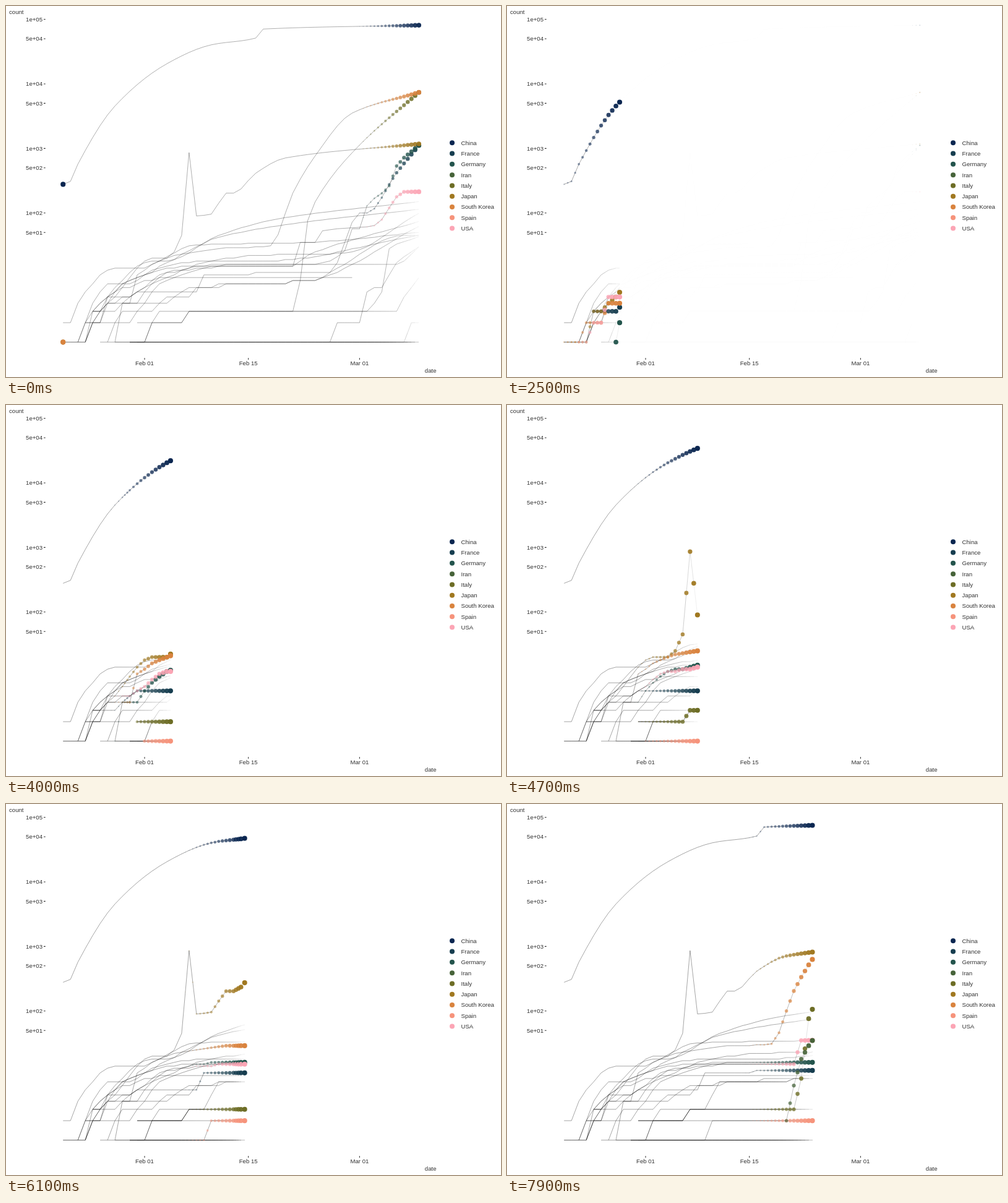
An HTML page that plays this animation: 800x600 px, repeating every 8 s.

```html
<!DOCTYPE html>
<html lang="en">
<head>
<meta charset="utf-8">
<title>Case counts by country</title>
<style>
  html, body { margin: 0; width: 100%; height: 100%; overflow: hidden; background: #fff; }
  svg { display: block; width: 800px; height: 600px; }
  text { font: 9.6px "Liberation Sans", Arial, sans-serif; fill: #333; }
</style>
</head>
<body>
<svg viewBox="0 0 800 600">
  <defs>
    <linearGradient id="fade" gradientUnits="userSpaceOnUse" x1="0" y1="0" x2="800" y2="0"></linearGradient>
    <linearGradient id="fadeNew" gradientUnits="userSpaceOnUse" x1="0" y1="0" x2="800" y2="0"></linearGradient>
  </defs>
  <g id="lines" fill="none" stroke-width="1"></g>
  <g id="dots"></g>
  <g id="axes"></g>
</svg>
<script>
const LOOP = 8000, HOLD = 1100, TICK = 100;
const STEPS = 100, WAKE = 20, INK = 0.06, LAST_DAY = 48;

// Turning points as "day:count"; growCurve fills in the days between.
const named = [
  ['China', '#0a2650', '0:278 1:309 2:571 7:4537 14:20471 20:40235 26:51174 27:70635 48:80904'],
  ['France', '#163d4f', '4:3 7:3 10:6 18:6 19:11 25:11 26:12 36:12 40:100 41:100 45:420 48:1116'],
  ['Germany', '#23544c', '7:1 8:4 9:4 14:12 22:16 34:16 38:26 39:57 40:57 41:129 44:262 45:534 48:1112'],
  ['Iran', '#466339', '30:2 32:18 35:61'],
  ['Italy', '#6d6d25', '10:2 16:2 17:3 31:3 32:9 33:76 35:229 40:1128 48:7375'],
  ['Japan', '#a07820', '0:1 3:1 4:3 5:3 8:7 12:20 14:20 16:45 17:862 18:90 20:96 22:203 23:203 26:414 30:712 48:1176'],
  ['South Korea', '#d9833e', '0:1 2:1 3:2 5:2 6:4 9:4 10:11 16:23 21:28 28:31 31:204 34:763 39:3526 48:7382'],
  ['Spain', '#f6937b', '11:1 19:1 20:2 35:2'],
  ['USA', '#fca5b5', '2:1 3:1 4:2 5:2 6:5 9:5 13:11 24:15 31:15 32:35 34:35 35:53 42:64 46:213 48:213']
];
const others = [
  '0:2 1:2 2:4 7:14 10:14 18:32 33:35 48:50',
  '3:2 6:8 8:8 14:17 21:42 31:68 48:114',
  '3:1 7:7 12:18 14:18 21:45 29:81 48:150',
  '4:3 7:4 12:8 20:18 26:22 38:24 48:99',
  '4:3 9:9 17:15 31:15 33:22 48:74',
  '3:2 8:2 14:9 23:16 45:16 48:30',
  '3:1 8:8 19:18 27:18 48:45',
  '2:1 6:5 14:10 39:10',
  '6:1 8:3 10:3 18:7 33:9 48:62',
  '8:4 17:5 18:7 33:9 46:45 48:45',
  '9:1 11:1 12:2 16:2 17:3 44:3 48:10',
  '9:1 11:1 13:3 40:3 43:6 44:28 48:43',
  '36:1 37:2 40:2 41:6 43:7 45:17 48:30',
  '46:1 47:2 48:2',
  ...[5, 7, 9, 9, 10].map(d => `${d}:1 ${LAST_DAY}:1`)
];
// These stop early and are gone by the end of the run.
const brief = ['Iran', 'Spain'];
const briefOthers = ['10:2 16:2 17:3 19:3 21:8 35:9', '10:2 35:2'];

const $ = id => document.getElementById(id);
const X = day => 92.2 + 11.98 * day;
const Y = count => 543.6 - 104.42 * Math.log10(count);

// Monotone cubic on the log scale, rounded to whole cases for every day.
function growCurve(str) {
  const keys = str.split(' ').map(p => p.split(':').map(Number)).map(([d, v]) => [d, Math.log10(v)]);
  const n = keys.length - 1;
  const rise = keys.slice(1).map(([d, v], i) => (v - keys[i][1]) / (d - keys[i][0]));
  const slope = keys.map((_, i) => {
    if (i === 0 || i === n) return rise[i && n - 1];
    const a = rise[i - 1], b = rise[i];
    return a * b > 0 ? 2 * a * b / (a + b) : 0;
  });
  const ys = [Y(10 ** keys[0][1])];
  for (let i = 0; i < n; i++) {
    const [a, va] = keys[i], [b, vb] = keys[i + 1], h = b - a;
    for (let d = a + 1; d <= b; d++) {
      const u = (d - a) / h, w = 1 - u;
      const v = va * w * w * (1 + 2 * u) + vb * u * u * (1 + 2 * w) + h * u * w * (slope[i] * w - slope[i + 1] * u);
      ys.push(Y(Math.round(10 ** v)));
    }
  }
  return { start: keys[0][0], ys };
}

function yAt({ start, ys }, day) {
  const i = Math.floor(day - start), u = day - start - i;
  if (i < 0 || i + Math.ceil(u) >= ys.length) return null;
  return u ? ys[i] + (ys[i + 1] - ys[i]) * u : ys[i];
}

// Two steps per day, but three on every sixteenth.
const heads = [0];
for (let d = 0; d < LAST_DAY; d++) {
  const n = [8, 23, 39].includes(d) ? 3 : 2;
  for (let i = 1; i <= n; i++) heads.push(d + i / n);
}

const series = named.map(([name, color, str]) => ({ name, color, curve: growCurve(str), brief: brief.includes(name) }));
const stack = [...series].sort((a, b) => (a.name === 'Iran') - (b.name === 'Iran'));

function drawStatic() {
  const line = ({ start, ys }, isBrief) =>
    `<path stroke="url(#${isBrief ? 'fadeNew' : 'fade'})" d="M${ys.map((y, i) => X(start + i).toFixed(2) + ' ' + y.toFixed(2)).join('L')}"/>`;
  $('lines').innerHTML = others.map(s => line(growCurve(s), false)).join('') +
    briefOthers.map(s => line(growCurve(s), true)).join('') +
    series.map(c => line(c.curve, c.brief)).join('');

  const text = (x, y, str, anchor = 'start') => `<text x="${x}" y="${y}" text-anchor="${anchor}">${str}</text>`;
  let out = text(5, 13, 'count') + text(695.5, 593, 'date', 'end');
  let ticks = '';
  for (const label of ['1e+05', '5e+04', '1e+04', '5e+03', '1e+03', '5e+02', '1e+02', '5e+01']) {
    const y = Y(Number(label));
    out += text(59, y + 3.5, label, 'end');
    ticks += `M61 ${y}H63.7`;
  }
  for (const [day, label] of [[11, 'Feb 01'], [25, 'Feb 15'], [40, 'Mar 01']]) {
    out += text(X(day), 581, label, 'middle');
    ticks += `M${X(day)} 569.3V572`;
  }
  series.forEach((c, i) => {
    const y = 221.3 + 17.28 * i;
    out += `<circle cx="721" cy="${y}" r="4" fill="${c.color}"/>` + text(735.5, y + 3.5, c.name);
  });
  $('axes').innerHTML = out + `<path d="${ticks}" stroke="#333" stroke-width="1.07"/>`;
}

// Past steps still showing, oldest first; early ones wrap to the end of the run.
function wakeOf(step) {
  const wake = [];
  for (let k = WAKE - 1; k >= 0; k--) {
    const wrapped = step < k;
    wake.push({ at: wrapped ? step - k + STEPS : step - k, wrapped, f: 1 - k / WAKE });
  }
  return wake;
}

// Ink of the overlaid fading lines, as hard gradient stops along x.
function stops(wake) {
  let out = '', last = -1;
  const stop = (x, a) => `<stop offset="${x / 800}" stop-color="#000" stop-opacity="${a}"/>`;
  for (let i = 1; i <= STEPS; i++) {
    let clear = 1;
    for (const w of wake) if (w.at >= i) clear *= 1 - INK * w.f * w.f;
    const a = 1 - clear, x = i === 1 ? 0 : X(heads[i - 1]);
    if (a !== last) {
      if (last >= 0) out += stop(x, last);
      out += stop(x, a);
      last = a;
    }
  }
  return out;
}

function render(step) {
  const wake = wakeOf(step);
  $('fade').innerHTML = stops(wake);
  $('fadeNew').innerHTML = stops(wake.filter(w => !w.wrapped));
  let out = '';
  for (const w of wake) {
    const day = heads[w.at];
    for (const c of stack) {
      const y = w.wrapped && c.brief ? null : yAt(c.curve, day);
      if (y === null) continue;
      out += `<circle cx="${X(day).toFixed(2)}" cy="${y.toFixed(2)}" r="${(0.15 + 3.9 * w.f).toFixed(2)}" fill="${c.color}" opacity="${w.f.toFixed(2)}"/>`;
    }
  }
  $('dots').innerHTML = out;
}

drawStatic();
let shown = -1;
const start = performance.now();
function frame() {
  const t = (performance.now() - start) % LOOP;
  const step = t < HOLD ? 0 : 1 + Math.floor((t - HOLD) / TICK);
  if (step !== shown) render(shown = step);
  requestAnimationFrame(frame);
}
frame();
</script>
</body>
</html>
```
